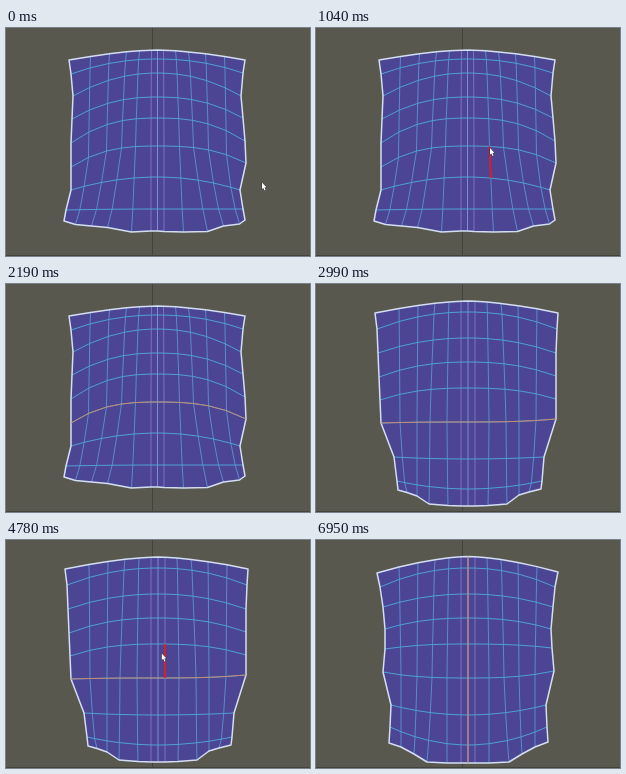
Animation of 304 by 228 pixels, one loop 8000 ms. Source, as an HTML page with a canvas:

```html
<!DOCTYPE html>
<html lang="en">
<head>
<meta charset="utf-8">
<title>Selecting edge loops</title>
<style>
html, body { margin: 0; width: 100%; height: 100%; overflow: hidden; background: #59584e; }
canvas { display: block; width: 304px; height: 228px; }
</style>
</head>
<body>
<canvas id="stage"></canvas>
<script>
const W = 304, H = 228, LOOP = 8000, STEP = 30;
const canvas = document.getElementById('stage');
const ctx = canvas.getContext('2d');
const ratio = window.devicePixelRatio || 1;
canvas.width = W * ratio;
canvas.height = H * ratio;

const RED = '#e5191c', ORANGE = '#c58b72', CYAN = '#50a5d9';
const BEND = [1.6, 2.1, 2.1, 2.3, 2.5, 2.7, 2, 2];
const ROWS = 9, COLS = 13, MID = 6;

// mid: row heights on the centre line; spread: column offsets at rows 0, 5 and 8
const cloth = buildMesh({
  cx: 151.5,
  mid: [22, 31, 45, 69, 90, 118, 149, 181, 203],
  left: [[63, 32], [65, 46], [67, 68], [66, 91], [65, 115], [65, 139], [65, 162], [60, 182], [58, 193]],
  right: [[239, 32], [237, 45], [235, 68], [237, 90], [239, 113], [240, 135], [234, 162], [237, 181], [239, 192]],
  spread: [[0, 6, 18, 31, 48, 67], [0, 6.5, 22, 36, 51, 69], [0, 6.5, 26, 50, 66, 82]],
  hemLeft: [203, 203, 204, 199.5, 198, 196.5],
  hemRight: [203, 203.5, 204, 203.5, 198, 196]
});
const flared = buildMesh({
  cx: 152,
  mid: [17, 28, 54, 78, 104, 138, 175, 205, 222],
  left: [[59, 29], [61, 45], [62, 69], [63, 93], [64, 116], [65, 139], [78, 173], [81, 197], [82, 206]],
  right: [[242, 29], [241, 45], [240, 69], [240, 92], [240, 115], [240, 135], [228, 173], [226, 197], [225, 205]],
  spread: [[0, 7, 19, 33, 50, 69], [0, 7, 21, 38, 51, 68], [0, 7, 20, 39, 51, 61]],
  hemLeft: [222, 222, 221.5, 220, 212, 208.5],
  hemRight: [222, 222, 221.5, 220, 211, 208]
});
const waisted = buildMesh({
  cx: 152,
  mid: [16.5, 28, 54, 78, 104, 138, 175, 205, 223],
  left: [[61, 33], [64, 47], [67, 67], [69, 89], [69, 109], [67, 132], [75, 165], [74, 187], [73, 203]],
  right: [[242, 32], [239, 47], [237, 67], [235, 89], [236, 108], [238, 131], [230, 165], [231, 187], [232, 202]],
  spread: [[0, 7, 19, 33, 50, 69], [0, 7, 21, 36, 51, 67], [0, 7, 21, 41, 54, 67]],
  hemLeft: [223, 223, 223, 222, 214, 207],
  hemRight: [223, 223, 223, 222, 214, 207]
});

// Pointer strokes: time, x, y. It is hidden between strokes.
const strokes = [
  { until: 2190, band: 5, keys: [[0, 256, 154.5], [530, 256, 154.5], [800, 220, 138], [1040, 174, 120],
    [1220, 166, 118], [2010, 166, 118], [2160, 264, 157]] },
  { until: 5750, band: 4, keys: [[4150, 280, 132], [4480, 202, 120], [4780, 152.5, 113],
    [5540, 152.5, 113], [5720, 276, 139]] }
];

function lerp(a, b, k) { return a + (b - a) * k; }

function buildMesh(m) {
  return Array.from({ length: ROWS }, (_, r) => Array.from({ length: COLS }, (_, c) => {
    const n = Math.abs(c - MID), side = c < MID ? -1 : 1;
    const edge = (side < 0 ? m.left : m.right)[r];
    if (n === MID) return edge;
    const off = r < 5
      ? lerp(m.spread[0][n], m.spread[1][n], r / 5)
      : lerp(m.spread[1][n], m.spread[2][n], (r - 5) / 3);
    const x = m.cx + side * off;
    if (r === ROWS - 1) return [x, (side < 0 ? m.hemLeft : m.hemRight)[n]];
    const u = off / Math.abs(edge[0] - m.cx);
    return [x, lerp(m.mid[r], edge[1], u ** BEND[r])];
  }));
}

const rowOf = (mesh, r) => mesh[r];
const colOf = (mesh, c) => mesh.map(row => row[c]);

function trace(points, color, width, closed) {
  ctx.beginPath();
  points.forEach(p => ctx.lineTo(p[0], p[1]));
  if (closed) ctx.closePath();
  ctx.strokeStyle = color;
  ctx.lineWidth = width;
  ctx.stroke();
}

function drawMesh(mesh) {
  const outline = [...mesh[0], ...colOf(mesh, COLS - 1),
    ...mesh[ROWS - 1].slice().reverse(), ...colOf(mesh, 0).reverse()];
  ctx.beginPath();
  outline.forEach(p => ctx.lineTo(p[0], p[1]));
  ctx.fillStyle = '#4b4593';
  ctx.fill();
  for (let c = 1; c < COLS - 1; c++) {
    const near = Math.abs(c - MID);
    trace(colOf(mesh, c), near > 1 ? '#5b94d2' : near ? '#8a72cf' : '#8b90df', 0.9);
  }
  for (let r = 1; r < ROWS - 1; r++) trace(rowOf(mesh, r), CYAN, 0.95);
  trace(outline, '#d3def2', 1.5, true);
}

function pointerAt(t) {
  const s = strokes.find(s => t >= s.keys[0][0] && t < s.until);
  if (!s) return null;
  const i = s.keys.findIndex(k => k[0] > t);
  if (i < 0) {
    const last = s.keys[s.keys.length - 1];
    return { x: last[1], y: last[2], band: s.band };
  }
  const a = s.keys[i - 1], b = s.keys[i], k = (t - a[0]) / (b[0] - a[0]);
  return { x: lerp(a[1], b[1], k), y: lerp(a[2], b[2], k), band: s.band };
}

// The upright edge closest to the pointer within its band of faces
function hoverEdge(mesh, p) {
  let best = null, reach = 8;
  for (let c = 1; c < COLS - 1; c++) {
    const a = mesh[p.band][c], b = mesh[p.band + 1][c];
    const d = Math.abs(lerp(a[0], b[0], (p.y - a[1]) / (b[1] - a[1])) - p.x);
    if (d < reach) { reach = d; best = [a, b]; }
  }
  return best;
}

function drawPointer(p) {
  ctx.save();
  ctx.translate(p.x, p.y);
  ctx.beginPath();
  [[0, 0], [0, 6.6], [1.4, 5.4], [2.5, 8], [3.6, 7.5], [2.6, 5], [4.4, 4.8]]
    .forEach(q => ctx.lineTo(q[0], q[1]));
  ctx.closePath();
  ctx.strokeStyle = '#34333f';
  ctx.lineWidth = 0.9;
  ctx.stroke();
  ctx.fillStyle = '#fff';
  ctx.fill();
  ctx.restore();
}

function draw(time) {
  const t = time < 2190 || time >= 4150 ? Math.floor((time + 10) / STEP) * STEP - 10 : time;
  const mesh = time < 2990 ? cloth : time < 6950 ? flared : waisted;
  ctx.setTransform(ratio, 0, 0, ratio, 0, 0);
  ctx.lineJoin = 'round';
  ctx.fillStyle = '#59584e';
  ctx.fillRect(0, 0, W, H);
  ctx.fillStyle = '#43433e';
  ctx.fillRect(146, 0, 1, H);
  ctx.fillRect(0, 227, W, 1);
  drawMesh(mesh);

  const rowEdge = mesh[5].slice(7, 9);
  const colEdge = colOf(mesh, MID).slice(4, 6);
  if (time >= 1610 && time < 5080) trace(rowOf(mesh, 5), ORANGE, 1);
  else if (time >= 1550 && time < 1610) trace(rowEdge, ORANGE, 1.2);
  if (time >= 5140) trace(colOf(mesh, MID), ORANGE, 1.2);
  else if (time >= 5080) trace(colEdge, ORANGE, 1.2);

  const p = pointerAt(Math.max(0, t));
  if (!p) return;
  const picked = (time >= 1550 && time < 2040) || (time >= 5080 && time < 5570);
  const edge = time >= 1130 && time < 2040 ? rowEdge : hoverEdge(mesh, p);
  if (edge && !picked) trace(edge, RED, 1.8);
  drawPointer(p);
}

const start = performance.now();
function tick() {
  draw((performance.now() - start) % LOOP);
  requestAnimationFrame(tick);
}
tick();
</script>
</body>
</html>
```
